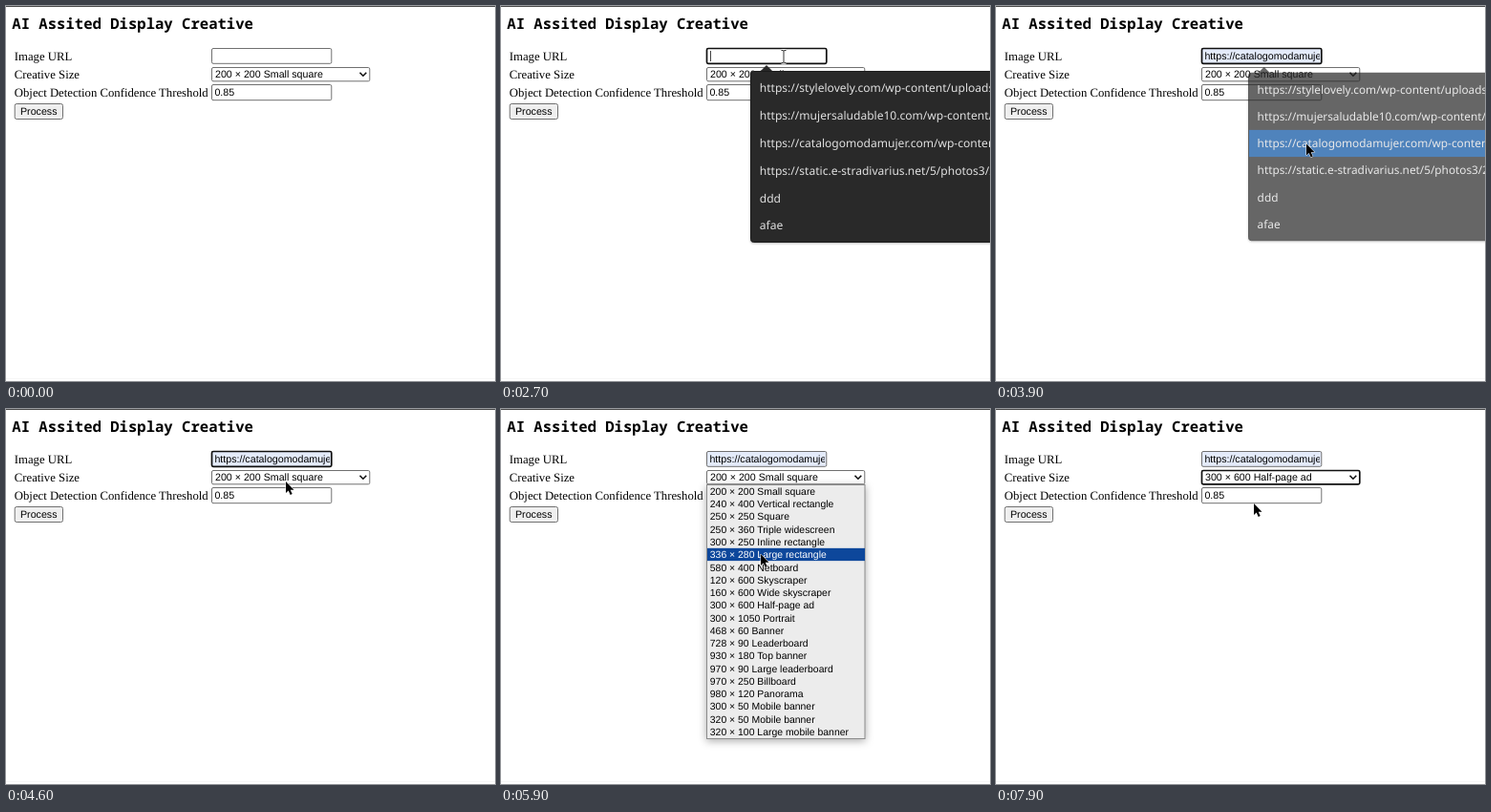
An HTML page that plays this animation: 512 by 393 pixels, repeating every 8 s.

```html
<!DOCTYPE html>
<html lang="en">
<head>
<meta charset="utf-8">
<title>AI Assited Display Creative</title>
<style>
  html, body { margin: 0; height: 100%; overflow: hidden; background: #fff; }
  svg { display: block; width: 100%; height: 100%; white-space: pre; text-rendering: geometricPrecision; }
  .title { font: bold 15.6px "Noto Sans Mono", monospace; }
  .label { font: 12.72px "Liberation Serif", serif; }
  .field { font: 10.67px "Liberation Sans", sans-serif; }
  .option { font: 10.43px "Liberation Sans", sans-serif; }
  .hint { font: 12.05px "Noto Sans", sans-serif; fill: #e0e0e0; }
  .box { fill: #fff; stroke: #707070; }
  .focus { stroke: #101010; stroke-width: 1.7; }
  .filled { fill: #e4ebfa; }
  #list { filter: drop-shadow(0 2px 4px #0005); }
  #popup { transform-origin: 412px 158px; filter: drop-shadow(0 1px 1px #0004); }
</style>
</head>
<body>
<svg viewBox="0 0 512 393">
  <clipPath id="inner"><rect x="217" y="45" width="122" height="15"/></clipPath>
  <rect width="512" height="1" fill="#4a4a4a"/>
  <rect y="390" width="512" height="1" fill="#f6f6f6"/>
  <text class="title" x="6.3" y="24">AI Assited Display Creative</text>
  <g class="label">
    <text x="8.8" y="56.5">Image URL</text>
    <text x="8.8" y="76">Creative Size</text>
    <text x="8.8" y="95">Object Detection Confidence Threshold</text>
  </g>
  <g class="field">
    <rect id="url" class="box" x="215.5" y="44.5" width="125.3" height="15.8" rx="1.5"/>
    <text id="urlText" x="218.4" y="55.8" clip-path="url(#inner)"></text>
    <path id="caret" d="M219.5 47v11" stroke="#444"/>
    <rect id="size" class="box" x="215.5" y="64.5" width="165.3" height="14.3" rx="1.5"/>
    <text id="sizeText" x="219" y="75.2"></text>
    <path d="M370.5 69.8l3.4 3.4 3.4-3.4" fill="none" stroke="#111" stroke-width="1.6"/>
    <rect class="box" x="215.5" y="82.5" width="125.3" height="16.2" rx="1.5"/>
    <text x="218.4" y="94.2">0.85</text>
    <rect class="box" x="9.2" y="102.5" width="50.3" height="16" rx="2" style="fill:#efefef"/>
    <text x="15" y="114.2">Process</text>
  </g>
  <g id="list">
    <rect x="215.5" y="79.5" width="165.5" height="266" fill="#ececec" stroke="#8c8c8c"/>
    <rect id="listMark" x="216" width="165" height="13.27" fill="#0d479b"/>
  </g>
  <g id="popup">
    <path d="M270.5 69.5l7.5-7.5 7.5 7.5z" fill="#292929"/>
    <rect x="261.5" y="68.5" width="301" height="179" rx="3" fill="#292929" stroke="#1b1b1b"/>
    <rect id="popupMark" x="262" width="300" height="28.8" fill="#0a52a2"/>
  </g>
  <g id="cursor">
    <path id="arrow" d="M0 0V12l2.7-2.5 2 4.5 2-.9-2-4.4h3.8z" stroke="#fff" paint-order="stroke"/>
    <g id="beam" fill="none">
      <path id="stem" d="M-2.5-6.5h1.7L0-5.8l.8-.7H2.5M0-6V6M-2.5 6.5h1.7L0 5.8l.8.7H2.5"/>
    </g>
  </g>
</svg>
<script>
const LOOP = 8000, STEP = 100;
const OPEN_HINTS = 2200, PICK_HINT = 3850, OPEN_LIST = 4700, PICK_SIZE = 7400, SHOW_CURSOR = 400;
const HINT_TOP = 71.7, HINT_H = 28.8, LIST_TOP = 79.5, LIST_H = 13.27;

const hints = [
  'https://stylelovely.com/wp-content/uploads/',
  'https://mujersaludable10.com/wp-content/up',
  'https://catalogomodamujer.com/wp-content/u',
  'https://static.e-stradivarius.net/5/photos3/20',
  'ddd', 'afae'
];
const sizes = [
  '200 × 200 Small square', '240 × 400 Vertical rectangle', '250 × 250 Square',
  '250 × 360 Triple widescreen', '300 × 250 Inline rectangle', '336 × 280 Large rectangle',
  '580 × 400 Netboard', '120 × 600 Skyscraper', '160 × 600 Wide skyscraper',
  '300 × 600 Half-page ad', '300 × 1050 Portrait', '468 × 60 Banner',
  '728 × 90 Leaderboard', '930 × 180 Top banner', '970 × 90 Large leaderboard',
  '970 × 250 Billboard', '980 × 120 Panorama', '300 × 50 Mobile banner',
  '320 × 50 Mobile banner', '320 × 100 Large mobile banner'
];
// Cursor path: time, x, y
const path = [
  [400, 330, 270], [1100, 296, 56], [1300, 296, 56], [1400, 294, 52], [2100, 294, 52],
  [2300, 296, 53], [2700, 296, 53], [3500, 322, 144], [3800, 325, 144.5], [3950, 325, 144.5],
  [4600, 293, 76], [4800, 292, 78], [5000, 292, 78], [5800, 272, 152], [5900, 272, 152],
  [6700, 271, 185], [7100, 271, 202], [7400, 271, 202], [7900, 270, 99]
];

const $ = id => document.getElementById(id);
const clamp = (v, lo = 0, hi = 1) => Math.min(hi, Math.max(lo, v));
const show = (id, on) => $(id).style.display = on ? '' : 'none';

function addRows(id, cls, x, baseline, pitch, rows) {
  return rows.map((row, i) => {
    const el = document.createElementNS('http://www.w3.org/2000/svg', 'text');
    el.setAttribute('class', cls);
    el.setAttribute('x', x);
    el.setAttribute('y', baseline + pitch * i);
    el.textContent = row;
    return $(id).appendChild(el);
  });
}
addRows('popup', 'hint', 270.8, 90.4, HINT_H, hints);
const options = addRows('list', 'option', 218.8, 89.9, LIST_H, sizes);

// The I-beam is a dark stroke over a wider white one
const stem = $('stem'), halo = stem.cloneNode();
halo.removeAttribute('id');
halo.setAttribute('stroke', '#fff');
halo.setAttribute('stroke-width', 2.4);
stem.setAttribute('stroke', '#333');
$('beam').prepend(halo);

function cursorAt(t) {
  const i = path.findIndex(p => p[0] > t);
  if (i === 0) return path[0].slice(1);
  if (i < 0) return path[path.length - 1].slice(1);
  const [t0, x0, y0] = path[i - 1], [t1, x1, y1] = path[i];
  const u = (t - t0) / (t1 - t0), e = u * u * (3 - 2 * u);
  return [x0 + (x1 - x0) * e, y0 + (y1 - y0) * e];
}

function draw(t) {
  const [x, y] = cursorAt(t);
  const fade = t < PICK_HINT ? clamp((t - OPEN_HINTS + 50) / 100) : clamp(1 - (t - PICK_HINT) / 175);
  const listOpen = t >= OPEN_LIST && t < PICK_SIZE;

  // Suggestions
  const hint = t < PICK_HINT ? Math.floor((y - HINT_TOP) / HINT_H) : 2;
  show('popup', fade > 0);
  $('popup').style.opacity = fade;
  $('popup').style.transform = `scale(${0.93 + 0.07 * fade})`;
  show('popupMark', hint >= 0);
  $('popupMark').setAttribute('y', HINT_TOP + HINT_H * hint);

  // Fields
  const url = t < OPEN_HINTS ? '' : hints[hint] || '';
  const urlFocus = t >= OPEN_HINTS && t < OPEN_LIST;
  $('urlText').textContent = url.slice(0, 24);
  $('url').classList.toggle('filled', url !== '');
  $('url').classList.toggle('focus', urlFocus);
  show('caret', urlFocus && !url);
  $('sizeText').textContent = sizes[t < PICK_SIZE ? 0 : 9];
  $('size').classList.toggle('focus', t >= PICK_SIZE);

  // Size list
  const pick = clamp(Math.floor((y - LIST_TOP) / LIST_H), 0, sizes.length - 1);
  show('list', listOpen);
  $('listMark').setAttribute('y', LIST_TOP + LIST_H * pick);
  options.forEach((el, i) => el.setAttribute('fill', i === pick ? '#fff' : '#000'));

  // Cursor
  const overInput = x > 215 && x < 341 && (y > 44 && y < 61 || y > 82 && y < 99);
  const beam = overInput && !listOpen && (fade === 0 || y < 62);
  show('cursor', t >= SHOW_CURSOR);
  show('beam', beam);
  show('arrow', !beam);
  $('cursor').setAttribute('transform', `translate(${x} ${y})`);
}

const start = performance.now();
function tick() {
  const t = (performance.now() - start) % LOOP;
  draw(Math.floor(t / STEP) * STEP);
  requestAnimationFrame(tick);
}
tick();
</script>
</body>
</html>
```
